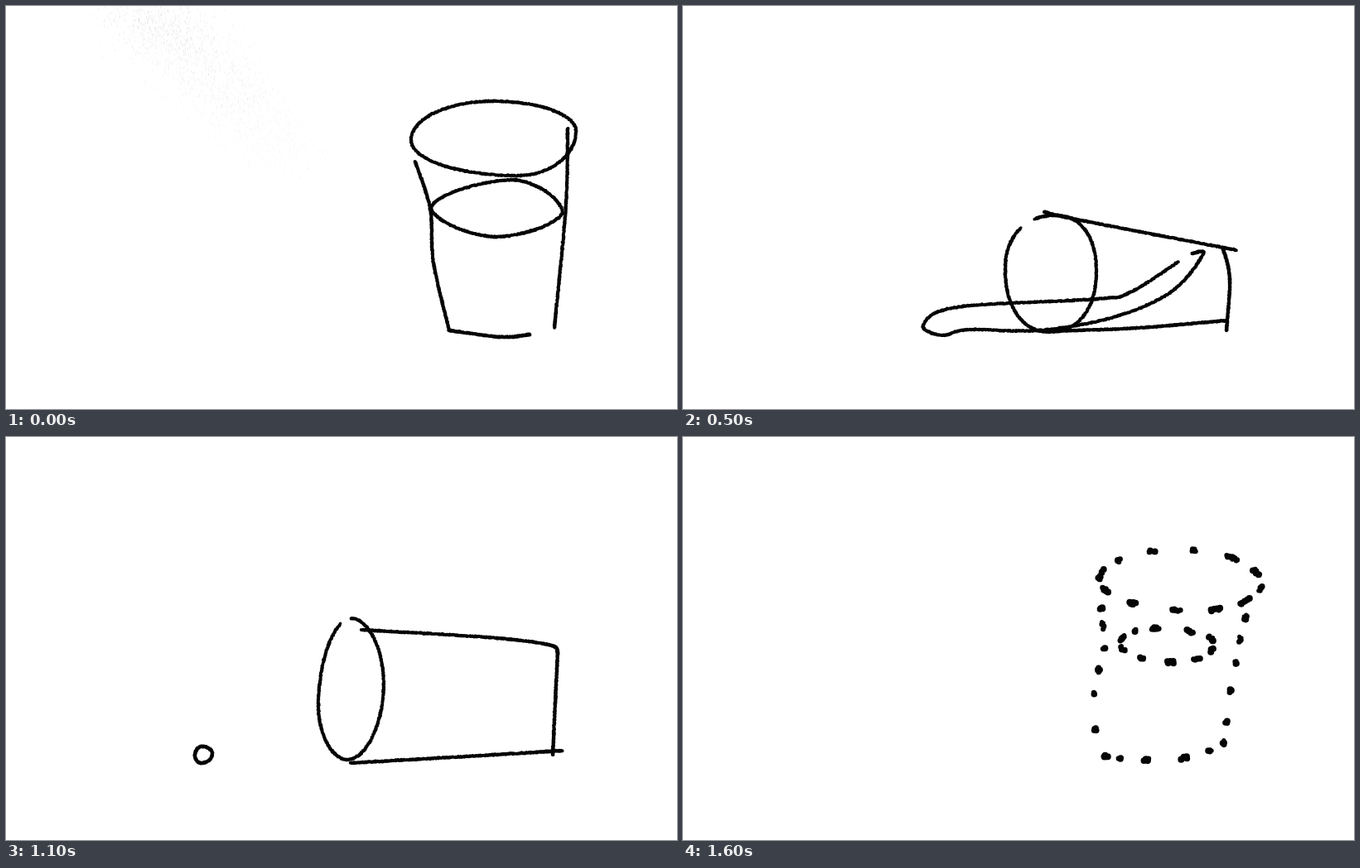
Write an HTML page with a canvas that moves like this. It is 810 px wide and 487 px high and loops after 1.7 s.

```html
<!DOCTYPE html>
<html lang="en">
<head>
<meta charset="utf-8">
<title>Glass of water</title>
<style>
html, body { margin: 0; width: 100%; height: 100%; overflow: hidden; background: #fff; }
canvas { display: block; }
</style>
</head>
<body>
<canvas id="stage" width="810" height="487"></canvas>
<script>
const ctx = document.getElementById('stage').getContext('2d');
const STEP = 100, SAMPLES = 120;

let seed = 1;
function rand() {
  seed = (seed * 16807) % 2147483647;
  return seed / 2147483647;
}
const jitter = amount => (rand() - 0.5) * 2 * amount;
const radians = degrees => degrees * Math.PI / 180;
const sample = fn => Array.from({ length: SAMPLES + 1 }, (_, i) => fn(i / SAMPLES));

// Lopsided oval joined from four quarter arcs between its extreme points.
// A power below 2 makes it pointed, above 2 boxy.
function oval(left, top, right, bottom, { from = 270, sweep = -360, power = 2 } = {}) {
  return sample(u => {
    const a = radians(from + sweep * u), c = Math.cos(a), s = Math.sin(a);
    const side = c > 0 ? right : left, cap = s > 0 ? bottom : top;
    return [
      cap[0] + (side[0] - cap[0]) * Math.abs(c) ** (2 / power),
      side[1] + (cap[1] - side[1]) * Math.abs(s) ** (2 / power)
    ];
  });
}

// Catmull-Rom curve through a few points.
function curve(...p) {
  const last = p.length - 1;
  return sample(u => {
    const i = Math.min(last - 1, Math.floor(u * last)), t = u * last - i;
    const b = p[i], c = p[i + 1], a = p[i - 1] || b, d = p[i + 2] || c;
    return [0, 1].map(k => b[k] + t / 2 * (c[k] - a[k] +
      t * (2 * a[k] - 5 * b[k] + 4 * c[k] - d[k] + t * (3 * (b[k] - c[k]) + d[k] - a[k]))));
  });
}

// Short marks of random length spread evenly over a line.
function dashes(line, count, longest = 11) {
  return Array.from({ length: count }, (_, i) => {
    const at = Math.round(i / count * SAMPLES);
    const [x, y] = line[at], [nx, ny] = line[at + 1];
    const k = (1 + rand() * longest) / 2 / Math.hypot(nx - x, ny - y);
    const dx = (nx - x) * k, dy = (ny - y) * k;
    return [[x - dx, y - dy], [x + dx, y + dy]];
  });
}

const blend = (a, b, u) => [a[0] + (b[0] - a[0]) * u, a[1] + (b[1] - a[1]) * u];
const mix = (a, b, u) => a.map((line, i) => line.map((p, j) => blend(p, b[i][j], u)));
const shift = (pose, dx, dy) => pose.map(line => line.map(([x, y]) => [x + dx, y + dy]));
function turn(pose, degrees, cx, cy) {
  const c = Math.cos(radians(degrees)), s = Math.sin(radians(degrees));
  return pose.map(line => line.map(([x, y]) =>
    [cx + (x - cx) * c - (y - cy) * s, cy + (x - cx) * s + (y - cy) * c]));
}

// Solid poses: rim, wall, base, wall, water.
const full = [
  oval([489, 162], [588, 115], [688, 151], [618, 205]),
  curve([494, 188], [512, 245], [516, 310], [535, 392]),
  curve([535, 392], [597, 400], [632, 397]),
  curve([678, 148], [676, 240], [662, 389]),
  oval([513, 244], [612, 210], [672, 249], [592, 279], { power: 1.6 })
];
const settled = [
  oval([508, 162], [575, 122], [696, 170], [655, 203]),
  curve([500, 169], [510, 265], [525, 379]),
  curve([525, 379], [620, 395], [667, 383]),
  curve([693, 182], [671, 290], [661, 378]),
  oval([513, 255], [580, 229], [670, 250], [585, 284]),
  curve([514, 261], [530, 267])
];
const pouring = [
  oval([389, 318], [450, 253], [499, 320], [443, 394], { from: 228, sweep: -341, power: 2.2 }),
  curve([436, 249], [475, 258], [668, 295]),
  curve([652, 293], [660, 330], [656, 392]),
  curve([445, 393], [550, 389], [656, 380]),
  curve([598, 309], [540, 346], [500, 354], [330, 364], [290, 386], [312, 398],
    [345, 391], [430, 392], [520, 376], [590, 345], [628, 300], [615, 299])
];
const spilled = [
  oval([367, 322], [400, 221], [458, 292], [403, 388], { from: 262, sweep: -352 }),
  curve([421, 227], [530, 240], [625, 249], [672, 245]),
  curve([672, 243], [670, 290], [660, 381]),
  curve([404, 379], [475, 380], [648, 373]),
  oval([124, 394], [285, 368], [374, 378], [170, 405], { power: 1.6 })
];
const drop = [
  oval([377, 325], [417, 219], [456, 298], [412, 390], { from: 250, sweep: -340, power: 1.9 }),
  curve([429, 233], [580, 242], [655, 251], [666, 260]),
  curve([666, 259], [660, 384]),
  curve([416, 394], [590, 384], [671, 379]),
  oval([228, 385], [237, 374], [249, 383], [236, 394])
];

seed = 4211;
const tilted = [
  ...dashes(oval([419, 198], [489, 134], [524, 160], [460, 224]), 10),
  ...dashes(curve([462, 194], [472, 165], [503, 171], [511, 198]), 4, 6),
  ...dashes(curve([546, 178], [584, 247], [643, 297]), 5, 15),
  ...dashes(curve([643, 297], [648, 332], [619, 379], [588, 383]), 5, 5),
  ...dashes(curve([448, 250], [492, 300], [568, 372], [588, 383]), 7),
  ...dashes(oval([476, 252], [515, 222], [545, 245], [500, 284]), 7),
  ...dashes(curve([556, 272], [549, 312], [588, 315], [618, 297]), 5)
];
const upright = [
  ...dashes(oval([503, 172], [600, 136], [698, 178], [615, 210], { from: 280 }), 12, 14),
  ...dashes(curve([505, 206], [508, 256], [496, 310], [500, 390]), 6, 8),
  ...dashes(curve([510, 386], [546, 390], [618, 386], [652, 370]), 5, 8),
  ...dashes(curve([652, 370], [667, 273], [683, 200]), 6, 6),
  ...dashes(oval([528, 248], [570, 231], [641, 250], [590, 272]), 10, 8)
];

// The puddle shrinks to a drop while it drifts back up.
function shrinking(u) {
  const pose = mix(spilled, drop, u);
  return [...pose.slice(0, 4), ...shift(pose.slice(4), -46 * (1 - u), 58 * (1 - u))];
}

const solidPoses = [
  full,
  mix(full, settled, 0.5),
  settled,
  turn(settled, -22, 595, 388),
  shift(turn(settled, -52, 595, 388), 15, -35),
  pouring,
  shift(mix(pouring, spilled, 0.5), 66, 16),
  spilled,
  shrinking(0.1),
  shrinking(0.4),
  shrinking(0.75),
  drop,
  mix(drop, spilled, 0.4).slice(0, 4)
];
const dashedPoses = [
  shift(turn(tilted, -30, 598, 345), 25, 0),
  tilted,
  turn(upright, -18, 585, 385),
  upright
];
const poses = [...solidPoses, ...dashedPoses];

// Rough pen line made of overlapping round touches.
function ink(line, radius, rough) {
  ctx.beginPath();
  for (let i = 1; i < line.length; i++) {
    const [a, b] = [line[i - 1], line[i]];
    const n = Math.max(2, Math.ceil(Math.hypot(b[0] - a[0], b[1] - a[1])));
    for (let s = 0; s <= n; s++) {
      const [x, y] = blend(a, b, s / n);
      const r = radius + jitter(rough / 2), px = x + jitter(rough), py = y + jitter(rough);
      ctx.moveTo(px + r, py);
      ctx.arc(px, py, r, 0, 7);
    }
  }
  ctx.fill();
}

function smudge() {
  for (let i = 0; i < 2000; i++) {
    const u = rand() ** 1.3;
    const x = 165 + u * 190 + (rand() + rand() + rand() - 1.5) * 58;
    const y = u * 190 + (rand() + rand() - 1) * 45;
    ctx.fillStyle = `rgba(0,0,0,${0.01 + 0.05 * rand() * (1 - u)})`;
    ctx.fillRect(Math.round(x), Math.round(y), 1, 3);
  }
}

function draw(step) {
  seed = 977 + step * 131;
  ctx.fillStyle = '#fff';
  ctx.fillRect(0, 0, 810, 487);
  if (step === 0) smudge();
  ctx.fillStyle = '#050505';
  const dashed = step >= solidPoses.length;
  for (const line of poses[step]) {
    if (dashed) ink(line, 3.3, 1.6);
    else ink(line, 2, 0.5);
  }
}

let shown = -1;
function tick() {
  const step = Math.floor(performance.now() / STEP) % poses.length;
  if (step !== shown) draw(shown = step);
  requestAnimationFrame(tick);
}
tick();
</script>
</body>
</html>
```
